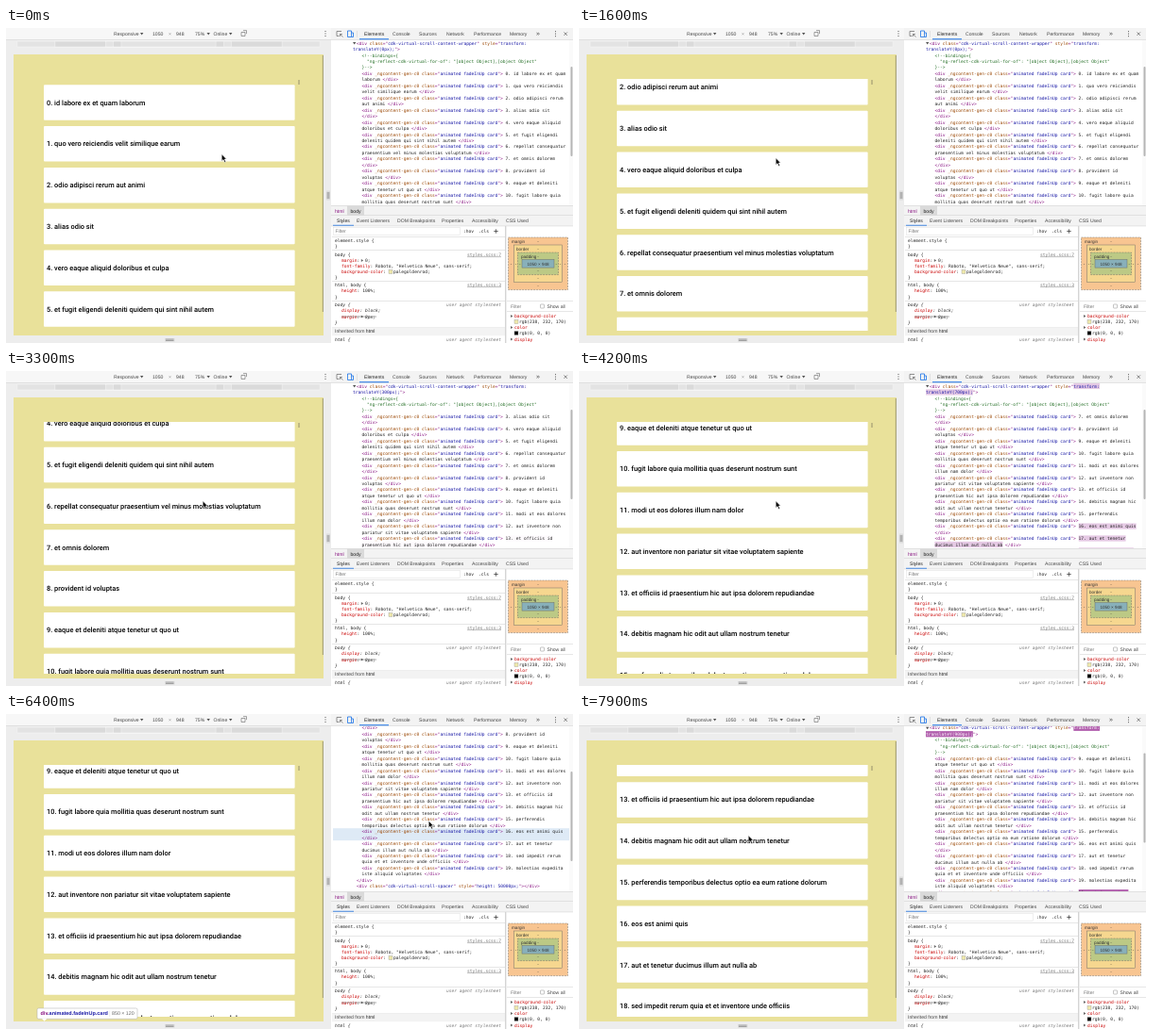
Recreate the animation shown at these times as an HTML page. Size 600x334 px, loop 8 s.

```html
<!DOCTYPE html>
<html>
<head>
<meta charset="utf-8">
<style>
html, body { margin: 0; width: 100%; height: 100%; overflow: hidden; background: #fff; }
svg { display: block; width: 600px; height: 334px; }
text { white-space: pre; text-rendering: geometricPrecision; font: 5.1px "Liberation Sans", Arial, sans-serif; fill: #444; }
.m { font: 4.6px "DejaVu Sans Mono", monospace; fill: #222; }
.card { font: 500 7.4px Roboto, sans-serif; fill: #000; }
</style>
</head>
<body>
<svg viewBox="0 0 600 334">
  <clipPath id="page"><rect x="8" y="28" width="328" height="298"/></clipPath>
  <clipPath id="list"><rect x="40" y="54" width="266" height="267"/></clipPath>
  <clipPath id="tree"><rect x="345" y="13" width="255" height="175"/></clipPath>
  <g id="fixed"></g>
  <g id="cards" clip-path="url(#list)"></g>
  <g id="nodes" clip-path="url(#tree)"></g>
  <g id="over" clip-path="url(#page)"></g>
  <path id="cursor" d="M0-3.5V4l1.8-1.6 1.3 2.9 1.3-.6L3.1 1.9H5.2Z" stroke="#fff" stroke-width=".6"/>
</svg>
<script>
const LOOP = 8000, CH = 2.77, LINE = 6.46, SCALE = 0.3128, COUNT = 13;
const TITLES = `id labore ex et quam laborum
quo vero reiciendis velit similique earum
odio adipisci rerum aut animi
alias odio sit
vero eaque aliquid doloribus et culpa
et fugit eligendi deleniti quidem qui sint nihil autem
repellat consequatur praesentium vel minus molestias voluptatum
et omnis dolorem
provident id voluptas
eaque et deleniti atque tenetur ut quo ut
fugit labore quia mollitia quas deserunt nostrum sunt
modi ut eos dolores illum nam dolor
aut inventore non pariatur sit vitae voluptatem sapiente
et officiis id praesentium hic aut ipsa dolorem repudiandae
debitis magnam hic odit aut ullam nostrum tenetur
perferendis temporibus delectus optio ea eum ratione dolorum
eos est animi quis
aut et tenetur ducimus illum aut nulla ab
sed impedit rerum quia et et inventore unde officiis
molestias expedita iste aliquid voluptates
aut deserunt ea quia sint
dolor sint quo a velit`.split('\n').map((s, i) => `${i}. ${s}`);

const $ = id => document.getElementById(id);
const esc = s => s.replace(/&/g, '&amp;').replace(/</g, '&lt;');
const span = (color, s) => `<tspan fill="${color}">${esc(s)}</tspan>`;
const tag = s => span('#881280', s), attr = s => span('#994500', s), val = s => span('#1a1aa6', s);
const red = s => span('#c80000', s);
const rect = (x, y, w, h, fill, more = '') => `<rect x="${x}" y="${y}" width="${w}" height="${h}" fill="${fill}" ${more}/>`;
const path = (d, fill, more = '') => `<path d="${d}" fill="${fill}" ${more}/>`;
const stroke = (d, color, w = 0.6) => path(d, 'none', `stroke="${color}" stroke-width="${w}"`);
// y is the vertical middle of the line
const label = (x, y, s, more = '') => `<text x="${x}" y="${y + 1.8}" ${more}>${s}</text>`;
const mono = (x, y, s, more = '') => `<text class="m" x="${x}" y="${y + 1.6}" ${more}>${s}</text>`;
const down = (x, y) => path(`M${x} ${y - 1}h3.4l-1.7 2.4z`, '#555');
const right = (x, y) => path(`M${x} ${y - 1.6}v3.2l2.4-1.6z`, '#666');

function deviceBar() {
  let s = rect(0, 0, 344, 334, '#ededed') + rect(0, 0, 344, 12.5, '#f7f7f7') + rect(0, 12.5, 344, 0.5, '#ccc');
  [1024, 768, 425, 375, 320].forEach((w, i) =>
    s += rect(172 - w * SCALE / 2, 14, w * SCALE, 6, i % 2 ? '#dadada' : '#e3e3e3', 'stroke="#f6f6f6" stroke-width=".5"'));
  s += label(114, 6, 'Responsive') + down(142, 6) + label(155, 6, '1050') + label(172, 6, '×', 'fill-opacity=".6"')
    + label(180, 6, '948') + label(200, 6, '75%') + down(212.5, 6) + label(219.5, 6, 'Online') + down(236, 6)
    + stroke('M249 4.5h4v4h-4zM251 2.6h3.5v3.5', '#666');
  [3.5, 6, 8.5].forEach(y => s += rect(337.5, y - 0.5, 1, 1, '#555'));
  s += rect(8, 28, 328, 298, '#e9e19a') + rect(334.8, 29, 1.2, 272, '#a9a479')
    + rect(309.4, 55, 1.2, 5, '#a49e72') + rect(339, 172.5, 4, 10, '#dcdcdc') + rect(168, 329, 10.5, 3.5, '#dcdcdc')
    + stroke('M340.2 174v7M341.8 174v7M169 330.1h8.5M169 331.5h8.5', '#777');
  return s;
}

function tabs() {
  let s = rect(344, 0, 256, 334, '#fff') + rect(344, 0, 256, 12.5, '#f3f3f3') + rect(344, 12.2, 256, 0.5, '#ccc');
  s += stroke('M355 3.5h-5v5h2.5M356.5 9.5l-3-3v2.4M353.5 6.5h2.4', '#666', 0.7)
    + stroke('M361.5 3h4v6.5h-4zM365.5 5h2v4.5h-2', '#1a73e8', 0.8) + rect(371, 3, 0.5, 7, '#ccc')
    + rect(374, 11.3, 31, 1, '#1a73e8');
  [[379, 'Elements'], [409, 'Console'], [437, 'Sources'], [466, 'Network'], [495, 'Performance'], [533, 'Memory']]
    .forEach(([x, name], i) => s += label(x, 6.2, name, i ? '' : 'style="fill:#222"'));
  s += label(561, 6, '»', 'style="font-size:7px"') + stroke('M590.5 4.5l3.4 3.4m0-3.4l-3.4 3.4', '#555', 0.7);
  [3.7, 6.2, 8.7].forEach(y => s += rect(581, y - 0.5, 1, 1, '#555'));

  s += rect(344, 188, 256, 22, '#f3f3f3') + rect(344, 188, 256, 0.5, '#ccc') + rect(361, 188.5, 18, 10, '#dadada')
    + label(348, 194, 'html', 'style="fill:#881280"') + label(364.5, 194, 'body', 'style="fill:#222"')
    + rect(344, 198.5, 256, 0.5, '#ccc') + rect(346, 208.8, 22, 1, '#1a73e8') + rect(344, 209.7, 256, 0.5, '#ccc');
  [[350, 'Styles'], [371, 'Event Listeners'], [414, 'DOM Breakpoints'], [461, 'Properties'], [493, 'Accessibility'], [529, 'CSS Used']]
    .forEach(([x, name], i) => s += label(x, 204, name, i ? '' : 'style="fill:#222"'));
  return s;
}

function styles() {
  const link = (y, s) => mono(524, y, s, 'text-anchor="end" text-decoration="underline" style="fill:#777"');
  const agent = y => mono(524, y, 'user agent stylesheet', 'text-anchor="end" style="fill:#777;font-style:italic"');
  const it = 'style="font-style:italic"';
  let s = rect(346.5, 211.5, 134, 8, '#fff', 'stroke="#ddd" stroke-width=".5"')
    + label(348.5, 215.5, 'Filter', 'style="fill:#777"') + mono(484, 215.5, ':hov') + mono(500, 215.5, '.cls')
    + stroke('M516.3 215.5h4.4M518.5 213.3v4.4', '#444', 0.8);
  [221, 235, 268, 289, 317].forEach(y => s += rect(345, y, 184, 0.5, '#ccc'));
  s += mono(348, 225, 'element.style {') + mono(348, 231.5, '}')
    + mono(348, 240, 'body {') + link(240, 'styles.scss:7')
    + mono(355, 246.5, red('margin') + ':  0;') + right(375.8, 246.5)
    + mono(355, 252.5, red('font-family') + ': Roboto, "Helvetica Neue", sans-serif;')
    + mono(355, 258.5, red('background-color') + ':') + rect(405, 256.5, 4, 4, '#eee8aa', 'stroke="#999" stroke-width=".4"')
    + mono(410, 258.5, 'palegoldenrod;') + mono(348, 264.5, '}')
    + mono(348, 272, 'html, body {') + link(272, 'styles.scss:3')
    + mono(355, 278.5, red('height') + ': 100%;') + mono(348, 285, '}')
    + mono(348, 293.5, 'body {', it) + agent(293.5)
    + mono(355, 299.5, red('display') + ': block;', it)
    + mono(355, 306, red('margin') + ':  8px;', it) + right(375.8, 306) + stroke('M355 306h37', '#555', 0.5)
    + mono(348, 312, '}', it)
    + rect(345, 317.3, 184, 9, '#f3f3f3') + label(348, 321.5, 'Inherited from ' + span('#222', 'html'))
    + mono(348, 330, 'html {', it) + agent(330);
  return s;
}

function boxModel() {
  const mid = 563;
  let s = rect(528, 210, 1.4, 124, '#d4d4d4');
  [[531.5, 222, '#f8c591', '2 1'], [537.5, 230, '#f6d78f', ''], [541.5, 238, '#bcc985', '2 1'], [546, 245.5, '#88b0ba', '']]
    .forEach(([x, y, fill, dash]) => s += rect(x, y, 2 * (mid - x), 2 * (249.8 - y), fill,
      `stroke="#666" stroke-width=".45" stroke-dasharray="${dash}"`));
  const small = 'style="font-size:4.6px;fill:#333"', centred = 'text-anchor="middle" ' + small;
  s += label(535, 226, 'margin', small) + label(540, 234, 'border', small) + label(545, 241.8, 'padding', small)
    + label(mid, 249.8, '1050 × 948', centred);
  [226, 234, 242, 257, 265.5, 273.5].forEach(y => s += label(mid, y, '-', centred));
  [28.5, 23.5, 19.2].forEach(d => s += label(mid - d, 249.8, '-', centred) + label(mid + d, 249.8, '-', centred));
  s += rect(530, 289.5, 70, 0.5, '#ccc') + label(534, 295, 'Filter', 'style="fill:#777"')
    + rect(565.5, 293, 4, 4, '#fff', 'rx=".6" stroke="#888" stroke-width=".5"') + label(572.5, 295, 'Show all')
    + rect(530, 300.5, 70, 0.5, '#ccc');
  [[305.5, 'background-color', 'rgb(238, 232, 170)', '#eee8aa'], [317.5, 'color', 'rgb(0, 0, 0)', '#000'], [330, 'display']]
    .forEach(([y, name, value, fill]) => {
      s += right(534, y) + mono(538, y, red(name));
      if (value) s += rect(538, y + 4, 4, 4, fill, 'stroke="#999" stroke-width=".4"') + mono(543, y + 6, value);
    });
  return s;
}

// Linear interpolation over [time, ...values] keys
function at(keys, t) {
  const n = keys.findIndex(k => k[0] > t);
  if (n < 0) return keys[keys.length - 1].slice(1);
  const a = keys[n - 1], b = keys[n], p = (t - a[0]) / (b[0] - a[0]);
  return a.slice(1).map((v, i) => v + (b[i + 1] - v) * p);
}
const SCROLL = [[0, 0], [300, 0], [1500, 332], [2000, 332], [2700, 473], [3200, 473], [3600, 640], [3700, 850],
  [4100, 1041], [7600, 1041], [7900, 1422]];
const TREE = [[0, 0], [4800, 0], [5200, 21.5], [5400, 21.5], [5700, 47], [6200, 47], [6400, 40], [6500, 40], [6800, 1.2]];
const POINTER = [[0, 229, 138], [900, 209, 142], [4200, 209, 142], [4500, 448, 116], [6400, 448, 117.5],
  [7200, 448, 117.5], [7500, 180, 133]];
const RANGES = [[0, 0], [2300, 3], [3700, 7], [7800, 9]];
const HOVERS = [[0, -1], [4500, 12], [5700, 16], [6800, 12], [7300, -1]];
const last = (steps, t) => steps.filter(k => k[0] <= t).length - 1;

function split(title) {
  const cut = title.length > 23 ? title.lastIndexOf(' ', 23) : title.length;
  return [title.slice(0, cut), title.slice(cut + 1)];
}

function nodes(t, step, hover) {
  const [since, first] = RANGES[step], left = 376.4;
  const scroll = at(TREE, t)[0];
  const glow = step ? Math.max(0, 1 - (t - since) / 1400) ** 3 : 0;
  const fresh = step ? RANGES[step - 1][1] + COUNT : Infinity;
  const flash = (x, y, n) => glow ? rect(x, y - 3.1, n * CH, 6.2, `rgba(158,54,153,${glow})`) : '';
  const value = s => glow > 0.5 ? span('#fff', s) : val(s);
  const row = i => 16 + LINE * i - scroll;
  const move = `translateY(${first * 100}px);`;
  let s = flash(371 + 55 * CH, row(0), 10) + flash(367, row(1), move.length)
    + down(367, row(0))
    + mono(371, row(0), tag('<div ') + attr('class') + tag('="') + val('cdk-virtual-scroll-content-wrapper') + tag('" ')
      + attr('style') + tag('="') + value('transform:'))
    + mono(367, row(1), value(move) + tag('">'));
  ['<!--bindings={', '  "ng-reflect-cdk-virtual-for-of": "[object Object],[object Object"', '}-->']
    .forEach((line, i) => s += mono(left, row(2 + i), span('#236e25', line)));
  const open = tag('<div ') + attr('_ngcontent-gen-c0 class') + tag('="') + val('animated fadeInUp card') + tag('"> ');
  for (let i = 0; i < COUNT && first + i < TITLES.length; i++) {
    const k = first + i, y = row(5 + 2 * i), [head, tail] = split(TITLES[k]);
    if (k === hover) s += rect(346, y - 3.4, 250, 2 * LINE, '#deeaf6');
    if (k >= fresh) s += flash(left + 55 * CH, y, head.length) + flash(left, y + LINE, tail.length);
    s += mono(left, y, open + esc(head)) + mono(left, y + LINE, esc(tail && tail + ' ') + tag('</div>'));
  }
  const end = 5 + 2 * COUNT;
  s += mono(371, row(end), tag('</div>'))
    + mono(371, row(end + 1), tag('<div ') + attr('class') + tag('="') + val('cdk-virtual-scroll-spacer') + tag('" ')
      + attr('style') + tag('="') + val('height: 50000px;') + tag('"></div>'));
  return s + rect(596, 13, 4, 175, '#fafafa') + rect(597.5, 41 + scroll * 0.5, 2, 95, '#b5b5b5', 'rx="1"');
}

function highlight(top) {
  const ring = (x, y, w, h, d) => `M${x} ${y}h${w}v${h}h${-w}zM${x + d} ${y + d}v${h - 2 * d}h${w - 2 * d}v${2 * d - h}z`;
  const y = Math.min(top - 20, 312);
  return path(ring(33.5, top - 6.3, 278.6, 50.1, 6.3), 'rgba(246,178,107,.9)')
    + path(ring(39.8, top, 266, 37.5, 3.1), 'rgba(147,196,125,.55)')
    + rect(42.9, top + 3.1, 259.8, 31.3, 'rgba(111,168,220,.72)')
    + rect(33, y, 106, 11.3, '#fff', 'rx="1.5" stroke="#aaa" stroke-width=".5"')
    + path(`M38 ${y + 11}l2.6 2.8 2.6-2.8z`, '#fff')
    + label(36.5, y + 5.2, tag('div') + val('.animated.fadeInUp.card'), 'style="font-weight:bold;font-size:5.5px"')
    + rect(109.7, y + 2.5, 0.4, 6.5, '#ccc') + label(112, y + 5.2, '850 × 120', 'style="fill:#666;font-size:5.3px"');
}

function draw(t) {
  const step = last(RANGES, t), first = RANGES[step][1], hover = HOVERS[last(HOVERS, t)][1];
  const scroll = at(SCROLL, t)[0];
  const top = k => 60.3 + SCALE * (100 * first + 140 * (k - first) - scroll);
  $('cards').innerHTML = TITLES.map((title, k) => k < first || k >= first + COUNT ? '' :
    rect(40, top(k), 265.6, 37.5, '#fff', 'rx="1"')
    + `<text class="card" x="43" y="${top(k) + 21.3}">${title}</text>`).join('');
  $('nodes').innerHTML = nodes(t, step, hover);
  $('over').innerHTML = hover < 0 ? '' : highlight(top(hover));
  $('cursor').setAttribute('transform', `translate(${at(POINTER, t).map(v => v - 0.8)})`);
}

$('fixed').innerHTML = deviceBar() + tabs() + styles() + boxModel();
function tick() {
  draw(Math.floor(performance.now() % LOOP / 100) * 100);
  requestAnimationFrame(tick);
}
tick();
</script>
</body>
</html>
```
